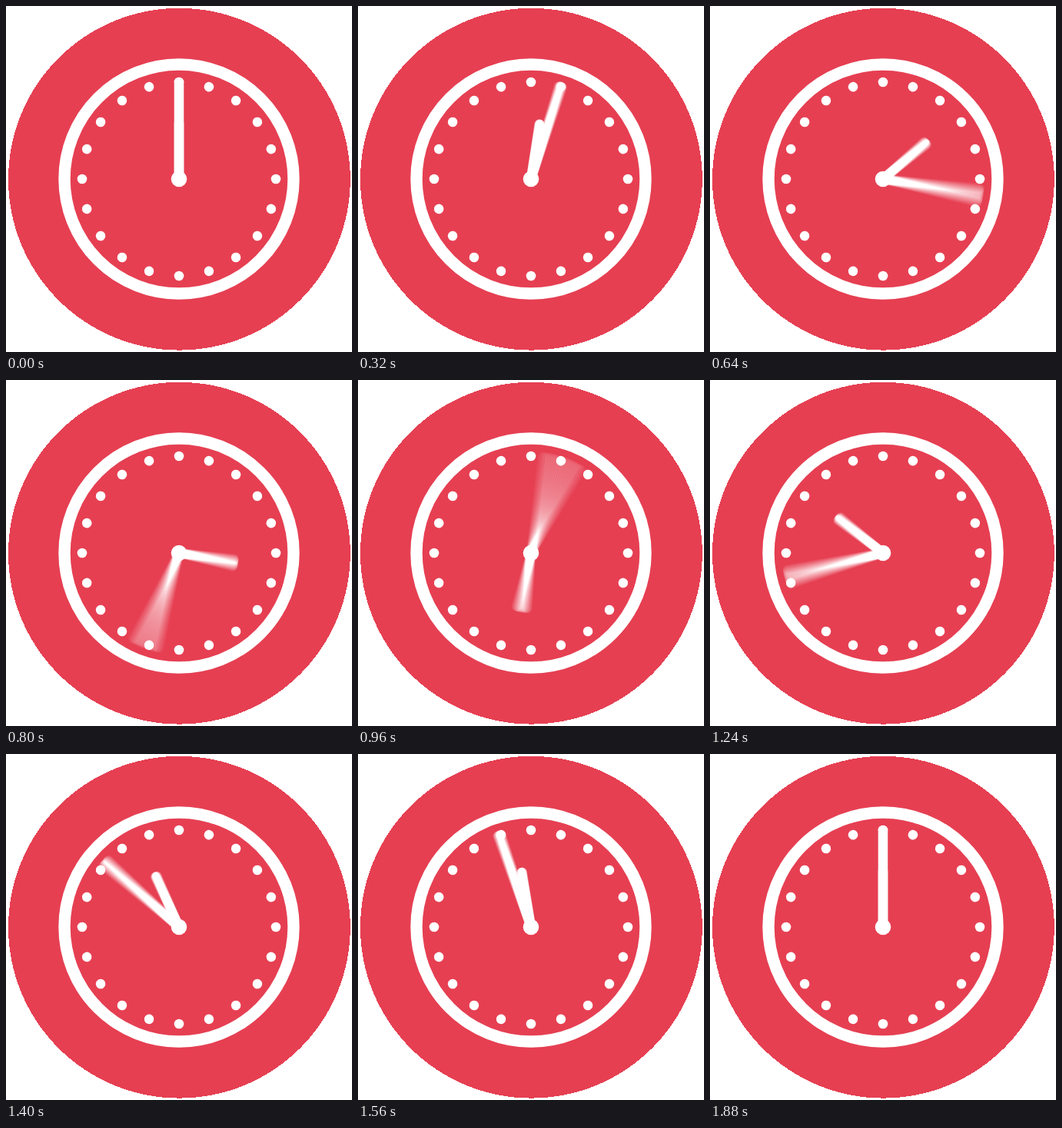
Recreate the animation shown at these times as an HTML page. Size 450 px wide and 450 px high, loop 1920 ms.

```html
<!DOCTYPE html>
<html lang="en">
<head>
<meta charset="utf-8">
<title>Clock</title>
<style>
  html, body { margin: 0; width: 100%; height: 100%; overflow: hidden; background: #fff; }
  svg { display: block; width: 100%; height: 100%; }
  .hand { isolation: isolate; }
  .hand line {
    stroke: #fff; stroke-width: 12.6; stroke-linecap: round;
    mix-blend-mode: plus-lighter;
  }
</style>
</head>
<body>
<svg viewBox="0 0 450 450">
  <circle cx="225.4" cy="225.2" r="222.4" fill="#e63f52" shape-rendering="crispEdges"/>
  <g id="clock" transform="translate(225 225)">
    <circle r="149" fill="none" stroke="#fff" stroke-width="15.4"/>
  </g>
</svg>
<script>
const LOOP = 1920, STEP = 40;   // ms
const TURN = 1890;              // ms for the whole sweep
const EASE = 0.7;               // handle length of the symmetric ease curve
const SHUTTER = 19;             // ms of motion blur around each step
const SAMPLES = 17;

const clock = document.getElementById('clock');

function add(parent, tag, attrs) {
  const el = document.createElementNS('http://www.w3.org/2000/svg', tag);
  for (const key in attrs) el.setAttribute(key, attrs[key]);
  return parent.appendChild(el);
}

function makeHand(length, turns) {
  const group = add(clock, 'g', { class: 'hand' });
  const lines = Array.from({ length: SAMPLES }, () =>
    add(group, 'line', { y2: -length, 'stroke-opacity': 1 / SAMPLES }));
  return { lines, turns };
}

for (let i = 0; i < 20; i++) {
  add(clock, 'circle', { cy: -126, r: 6.3, fill: '#fff', transform: `rotate(${i * 18})` });
}
const hands = [makeHand(126, 2), makeHand(72, 1)];
add(clock, 'circle', { r: 10.3, fill: '#fff' });

// Cubic bezier (EASE, 0, 1 - EASE, 1), solved by bisection.
function ease(p) {
  if (p <= 0) return 0;
  if (p >= 1) return 1;
  let low = 0, high = 1;
  for (let i = 0; i < 24; i++) {
    const u = (low + high) / 2, v = 1 - u;
    const x = 3 * EASE * u * v * v + 3 * (1 - EASE) * u * u * v + u * u * u;
    if (x < p) low = u; else high = u;
  }
  return low * low * (3 - 2 * low);
}

function draw(time) {
  const t = Math.floor((time % LOOP + 0.5) / STEP) * STEP;
  for (let i = 0; i < SAMPLES; i++) {
    const offset = (i / (SAMPLES - 1) - 0.5) * SHUTTER;
    const progress = ease((t + offset) / TURN);
    for (const { lines, turns } of hands) {
      lines[i].setAttribute('transform', `rotate(${(progress * turns * 360).toFixed(3)})`);
    }
  }
}

const start = performance.now();
function tick() {
  draw(performance.now() - start);
  requestAnimationFrame(tick);
}
tick();
</script>
</body>
</html>
```
